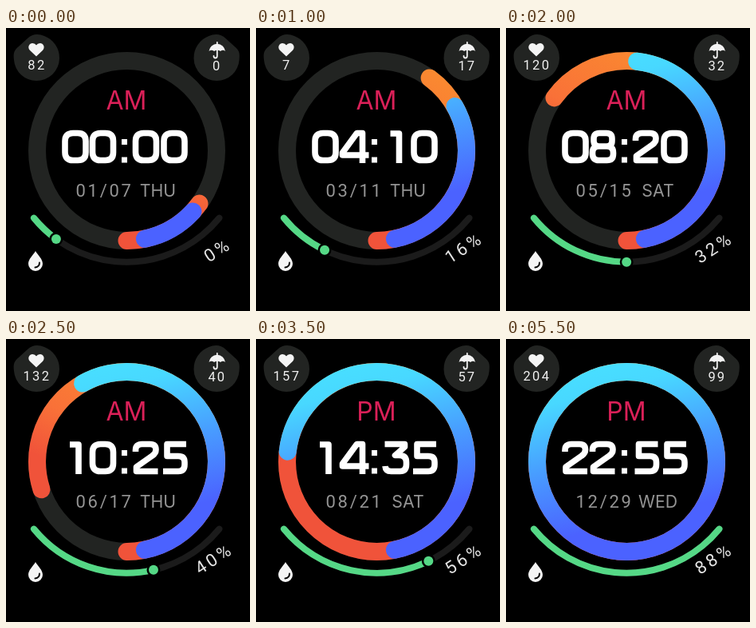
Animation, 306 px wide and 354 px high, one loop 6000 ms. Source, as an HTML page with a canvas:

```html
<!DOCTYPE html>
<html lang="en">
<head>
<meta charset="utf-8">
<title>Watch face</title>
<style>
html, body { margin: 0; height: 100%; background: #000; overflow: hidden; }
canvas { display: block; width: 306px; height: 354px; }
</style>
</head>
<body>
<canvas id="face"></canvas>
<script>
const canvas = document.getElementById('face');
const ctx = canvas.getContext('2d');
const dpr = window.devicePixelRatio || 1;
canvas.width = 306 * dpr;
canvas.height = 354 * dpr;

const STEP = 500, COUNT = 12;
const PULSE = [82, 94, 7, 108, 120, 132, 144, 157, 173, 190, 197, 204];
const RAIN = [0, 8, 17, 24, 32, 40, 48, 57, 70, 82, 90, 99];
// Humidity slider, in degrees from the bottom of its arc
const END = 50.7;
const SLIDER = [-36, -31, -25.7, -13, 0, 13, 13, 25.7, 13, END, END, END];
const DAYS = ['SUN', 'MON', 'TUE', 'WED', 'THU', 'FRI', 'SAT'];

const ring = { x: 151.5, y: 153.5, r: 112.5 };
const scale = { x: 151.2, y: 142.5, r: 150.2 };

// Stroked numerals in a 34 x 41 cell
const box = (x, y, r, b, c) => `M${x + c} ${y}H${r - c}Q${r} ${y} ${r} ${y + c}V${b - c}` +
  `Q${r} ${b} ${r - c} ${b}H${x + c}Q${x} ${b} ${x} ${b - c}V${y + c}Q${x} ${y} ${x + c} ${y}Z`;
const GLYPHS = {
  0: box(4, 3.5, 30, 37.5, 10),
  1: 'M10 4H21V41',
  2: 'M4 13V11Q4 3.5 12 3.5H22Q29.5 3.5 29.5 10.5Q29.5 15 25 18L5 32V37.5H32',
  3: 'M3 3.5H28V7L16 17.5H21Q30 17.5 30 26V29Q30 37.5 22 37.5H11Q4 37.5 3.5 31',
  4: 'M37 31H4V28L22 3.5H29V41',
  5: 'M32 3.5H8V18.5H22Q30 18.5 30 26V29Q30 37.5 22 37.5H3',
  6: 'M28 3.5H15Q4 3.5 4 14V28Q4 37.5 13 37.5H21Q30 37.5 30 28Q30 19 21 19H4',
  8: box(5.5, 3.5, 28.5, 20, 7) + box(4, 20, 30, 37.5, 8)
};
for (const d in GLYPHS) GLYPHS[d] = new Path2D(GLYPHS[d]);

const BUBBLE = new Path2D('M10 40C9 31 10 28 16 23L27 13C33 7 41 7 48 10' +
  'A29 29 0 0 1 67 38A28.5 28.5 0 0 1 38 66A28 28 0 0 1 10 40Z');
const HEART = new Path2D('M38 35.5L30.3 28.3C26 24 29.5 19 33.3 19Q36.5 19 38 21.5' +
  'Q39.5 19 42.7 19C46.500 19 50 24 45.700 28.3Z');
const CANOPY = new Path2D('M254.500 29A10.300 10.300 0 0 1 275 29Q272 26.500 269 29' +
  'Q265 26.500 261 29Q257.500 26.500 254.500 29Z');
const HANDLE = new Path2D('M264.800 18V35Q264.800 37.500 262.500 37.500Q260.500 37.500 260.500 35');
const DROP = new Path2D('M37 279C40 284 46 289 46 295A9 9 0 0 1 28 295C28 289 34 284 37 279Z');
const SHINE = new Path2D('M42 293.500Q42 299 36.500 299.500');

function gradient(x1, y1, x2, y2, ...stops) {
  const g = ctx.createLinearGradient(x1, y1, x2, y2);
  stops.forEach(([at, color]) => g.addColorStop(at, color));
  return g;
}
const warm = gradient(220, 50, 100, 270, [0, '#fa8a30'], [.43, '#f97138'], [.68, '#f0533a']);
const cool = gradient(122, 35, 182, 272, [0, '#48deff'], [.12, '#48d8ff'], [.45, '#489cff'], [.8, '#4b62ff']);

function stroke(path, color, width) {
  ctx.strokeStyle = color;
  ctx.lineWidth = width;
  ctx.stroke(path);
}

function fill(path, color) {
  ctx.fillStyle = color;
  ctx.fill(path);
}

// Angles run counterclockwise from straight down
const rad = deg => (90 - deg) * Math.PI / 180;

function arc(c, from, to, color, width) {
  const p = new Path2D();
  const full = to - from >= 360;
  p.arc(c.x, c.y, c.r, full ? 0 : rad(from), full ? 2 * Math.PI : rad(to), !full);
  ctx.lineCap = 'round';
  stroke(p, color, width);
}

function dot(x, y, r, color) {
  const p = new Path2D();
  p.arc(x, y, r, 0, 2 * Math.PI);
  fill(p, color);
}

function text(str, x, y, size, color, { gap = 0, turn = 0, font = 'Roboto' } = {}) {
  ctx.save();
  ctx.translate(x, y);
  ctx.rotate(turn * Math.PI / 180);
  ctx.font = `${size}px ${font}, sans-serif`;
  ctx.letterSpacing = gap + 'px';
  ctx.textAlign = 'center';
  ctx.fillStyle = color;
  ctx.fillText(str, gap / 2, 0);
  ctx.restore();
}

const pad = n => String(n).padStart(2, '0');

function clock(hour, minute) {
  ctx.lineCap = 'butt';
  ctx.lineJoin = 'round';
  [...pad(hour) + pad(minute)].forEach((d, i) => {
    ctx.save();
    ctx.translate([70, 104.5, 158.5, 194][i], 128);
    stroke(GLYPHS[d], '#fff', 7.6);
    ctx.restore();
  });
  ctx.fillStyle = '#fff';
  ctx.fillRect(145, 139, 7, 7);
  ctx.fillRect(145, 161.5, 7, 7);
}

function badges(k) {
  fill(BUBBLE, '#222422');
  ctx.save();
  ctx.translate(302.5, 0);
  ctx.scale(-1, 1);
  fill(BUBBLE, '#222422');
  ctx.restore();
  fill(HEART, '#f4f4f4');
  fill(CANOPY, '#f4f4f4');
  ctx.lineCap = 'round';
  stroke(HANDLE, '#f4f4f4', 1.8);
  text(PULSE[k], 37.7, 52.3, 16.5, '#f0f0f0', { gap: 2.4 });
  text(RAIN[k], 263.7, 53, 16.5, '#f0f0f0', { gap: 2 });
}

function slider(k) {
  const at = SLIDER[k];
  arc(scale, -END, END, '#1b1b1b', 8);
  arc(scale, -END, at, '#55d886', 8);
  if (at < END) {
    const x = scale.x + scale.r * Math.cos(rad(at));
    const y = scale.y + scale.r * Math.sin(rad(at));
    dot(x, y, 8.5, '#000');
    dot(x, y, 6, '#55d886');
  }
  fill(DROP, '#f4f4f4');
  ctx.lineCap = 'round';
  stroke(SHINE, '#000', 2);
  const short = k < 2;
  text(k * 8 + '%', short ? 268 : 263.5, short ? 285 : 282, 22, '#e4e4e4', { gap: 3.8, turn: -33 });
}

function draw(k) {
  ctx.setTransform(dpr, 0, 0, dpr, 0, 0);
  ctx.fillStyle = '#000';
  ctx.fillRect(0, 0, 306, 354);
  badges(k);

  arc(ring, 0, 360, '#222422', 22);
  arc(ring, 0, 18 * Math.round(3 + 2.5 * k), warm, 22);
  arc(ring, 11.5, 11.5 + 18 * Math.ceil(2 + 18 * k / 11), cool, 22);
  slider(k);

  const day = 7 + 2 * k;
  text(k < 6 ? 'AM' : 'PM', 151, 102.3, 32, '#da2058', { font: 'Inter' });
  clock(2 * k, 5 * k);
  text(`${pad(k + 1)}/${pad(day)}`, 122.2, 210.7, 22, '#949494', { gap: 2.7 });
  text(DAYS[new Date(2021, k, day).getDay()], 190.5, 210.7, 21.3, '#949494', { font: 'Inter' });
}

function tick() {
  draw(Math.floor(performance.now() / STEP) % COUNT);
  requestAnimationFrame(tick);
}
tick();
</script>
</body>
</html>
```
